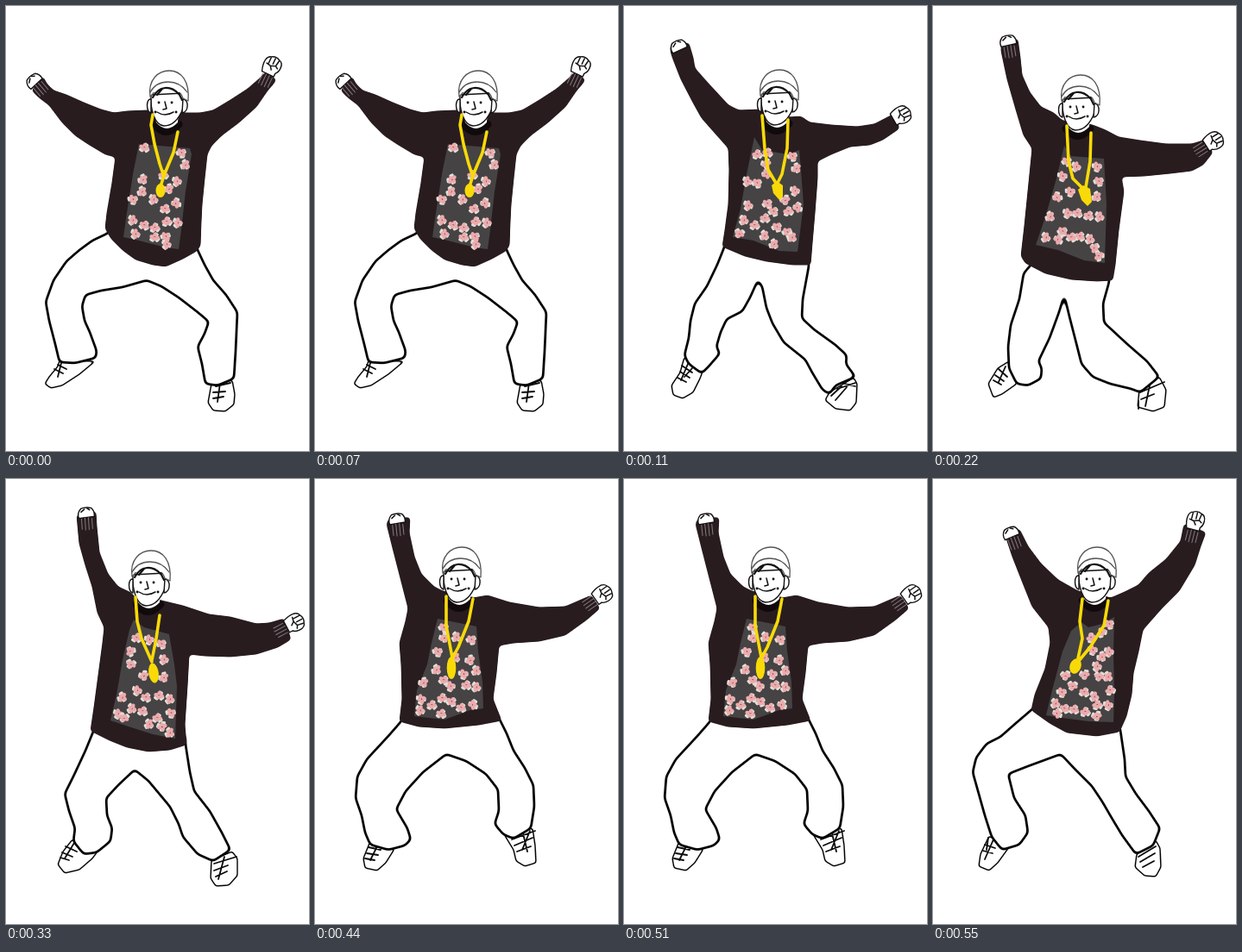
Recreate the animation shown at these times as an HTML page without scripts. Size 351x516 px, loop 660 ms.

```html
<!DOCTYPE html>
<html lang="en">
<head>
<meta charset="utf-8">
<title>Dancer</title>
<style>
html, body { margin: 0; width: 100%; height: 100%; overflow: hidden; background: #fff; }
svg { display: block; width: 100%; height: 100%; stroke-linecap: round; stroke-linejoin: round; }
.pose { opacity: 0; animation: show 660ms step-end infinite; animation-delay: calc(var(--i) * 110ms - 660ms); }
@keyframes show { 0% { opacity: 1; } 16.6666%, 100% { opacity: 0; } }
.pants { filter: url(#outline); }
.shoes { filter: url(#fine); }
.laces { fill: none; stroke: #0c0a0a; stroke-width: 1.8; }
.top { fill: #281c20; stroke: #281c20; stroke-width: 1; filter: url(#soft); }
.panel { fill: #464344; }
.print { fill: none; marker: url(#flower); }
.chain { fill: none; stroke: #f8da08; stroke-width: 3.6; }
.charm { fill: #f8da08; }
.ink { fill: #fff; stroke: #141212; stroke-width: 1.4; }
.cap { fill: #fff; stroke: #555; stroke-width: 1.3; }
.line { fill: none; stroke: #141212; stroke-width: 1.5; }
</style>
</head>
<body>
<svg viewBox="0 0 351 516">
<defs>
  <!-- Round the corners of a silhouette: blur, then sharpen the edge -->
  <filter id="soft" color-interpolation-filters="sRGB">
    <feGaussianBlur stdDeviation="2.3"/>
    <feComponentTransfer>
      <feFuncR type="linear" slope="0" intercept=".157"/>
      <feFuncG type="linear" slope="0" intercept=".11"/>
      <feFuncB type="linear" slope="0" intercept=".125"/>
      <feFuncA type="linear" slope="6" intercept="-2.5"/>
    </feComponentTransfer>
  </filter>
  <!-- White shape with a soft-cornered ink line: two cuts through one blur -->
  <filter id="outline" color-interpolation-filters="sRGB">
    <feGaussianBlur in="SourceAlpha" stdDeviation="2.8" result="blur"/>
    <feComponentTransfer in="blur" result="ink">
      <feFuncA type="linear" slope="7" intercept="-1.6"/>
    </feComponentTransfer>
    <feComponentTransfer in="blur" result="cut">
      <feFuncA type="linear" slope="7" intercept="-4.4"/>
    </feComponentTransfer>
    <feFlood flood-color="#fff"/>
    <feComposite in2="cut" operator="in" result="fill"/>
    <feMerge><feMergeNode in="ink"/><feMergeNode in="fill"/></feMerge>
  </filter>
  <filter id="fine" color-interpolation-filters="sRGB">
    <feGaussianBlur in="SourceAlpha" stdDeviation="1.7" result="blur"/>
    <feComponentTransfer in="blur" result="ink">
      <feFuncA type="linear" slope="4" intercept="-.78"/>
    </feComponentTransfer>
    <feComponentTransfer in="blur" result="cut">
      <feFuncA type="linear" slope="4" intercept="-2.22"/>
    </feComponentTransfer>
    <feFlood flood-color="#fff"/>
    <feComposite in2="cut" operator="in" result="fill"/>
    <feMerge><feMergeNode in="ink"/><feMergeNode in="fill"/></feMerge>
  </filter>
  <marker id="flower" orient="auto" markerUnits="userSpaceOnUse" markerWidth="16" markerHeight="16" viewBox="-8 -8 16 16">
    <path d="M-4 3l2 1M3 4l2-2M1-4l2 1" stroke="#dfe0d8" stroke-width="3.4" stroke-linecap="round"/>
    <path d="M-3.5-.5h.8M.3-2.8h.6M3.2.5h.6M-.3 2.2h.6" stroke="#eeaaad" stroke-width="4.4" stroke-linecap="round"/>
  </marker>
  <g id="fist">
    <path class="ink" d="M-8 10Q-11 2-10-4-9-9-5-10 0-13 5-10 10-9 10-2 10 3 7 6L7 10Z"/>
    <path class="line" d="M-5-9L-5-2M0-10L0-3M5-9L4-3M-7-1L-2 0 4-2 7 0M-2 0L1 4"/>
  </g>
  <g id="palm">
    <path class="ink" d="M-9 6Q-11 0-6-5 0-7 6-5 10-1 9 5Z"/>
    <path class="line" d="M-6-1L-2-4M1-5L4-3"/>
  </g>
  <path id="cuff" d="M-6-6V6M-2-7V7M2-7V7M6-6V6" stroke="#857a7e" fill="none"/>
  <g id="head">
    <path d="M-14 22Q-1 39 14 22" fill="none" stroke="#100a0c" stroke-width="9"/>
    <path d="M-14 8L-12 20Q0 34 13 20L14 6Z" fill="#fff"/>
    <path class="ink" d="M-18-12C-19 5-14 23-3 24 8 24 15 14 19 4L20-14Z"/>
    <path class="ink" d="M-18-7C-24-8-24 7-18 9ZM19-7C26-7 26 8 18 9Z"/>
    <path class="cap" d="M-19-10C-22-30-9-40 3-40 17-40 27-28 25-5L19-8C15-22-8-26-17-12Z"/>
    <path class="cap" d="M-19-15C-10-31 13-31 24-15"/>
    <path d="M-16-9C-9-23 5-23 14-13M-5-19L-11-12M14-14L18-6" fill="none" stroke="#141212" stroke-width="2.2"/>
    <path class="line" d="M-2-4L0 4-4 5M-11 8Q-2 14 8 8"/>
    <path d="M-9-3h.1M6-3h.1M-13 8h.1M11 8h.1" stroke="#141212" stroke-width="2.8"/>
  </g>
</defs>

<g class="pose" style="--i:0">
  <path class="shoes" d="M62 411L60 418 50 430 45 438 52 443 65 440 85 427 103 412ZM238 438L234 460 240 469 254 470 264 462 265 450 262 434Z"/>
  <path class="laces" d="M56 421L66 426M60 416L70 421M64 414L60 430M240 448L254 447M240 455L252 453M248 437L245 459M243 441L260 437"/>
  <path class="pants" d="M122 255L119 263 100 272 85 283 70 296 55 318 46 343 50 365 57 392 62 413 80 414 104 408 105 400 97 378 91 365 88 348 92 335 110 330 135 326 163 318 180 325 200 338 222 355 235 366 230 380 222 395 227 415 231 438 245 440 264 432 266 400 268 355 255 335 240 318 230 300 222 283 218 272Z"/>
  <path class="top" d="M43 82L47 90 55 98 70 103 90 112 110 120 125 124 140 122 163 121 207 124 225 124 240 121 260 109 280 96 296 82 300 77 313 85 310 90 303 98 290 117 270 135 250 150 238 162 233 172 230 200 227 230 226 250 225 278 221 284 205 293 185 302 170 300 150 294 135 283 122 270 115 258 117 240 123 205 127 175 115 172 95 160 80 150 65 135 50 115 38 106 30 98Z"/>
  <path class="panel" d="M154 160L213 165 215 172 208 215 203 260 200 282 185 280 150 271 136 268 140 240 147 195Z"/>
  <path class="print" d="M160 164L203 170 208 184 159 201 158 215 147 224 182 196 198 203 189 212 171 224 184 235 197 229 147 248 160 254 172 257 186 250 199 251 150 264 172 268 185 267 186 276"/>
  <use href="#head" x="186" y="115"/>
  <path class="chain" d="M170 126L168 138 172 160 178 183 183 198M199 146L194 170 184 194 178 212"/>
  <ellipse class="charm" cx="179" cy="214" rx="5.5" ry="8"/>
  <g transform="translate(32 86) rotate(-40)"><use href="#palm"/><use href="#cuff" y="13"/></g>
  <g transform="translate(308 70) rotate(25)"><use href="#fist"/><use href="#cuff" y="18"/></g>
</g>

<g class="pose" style="--i:1">
  <path class="shoes" d="M70 407L65 425 55 440 57 451 68 455 80 448 88 432 91 424ZM238 448L233 457 245 467 262 469 269 460 270 438 266 431Z"/>
  <path class="laces" d="M67 417L79 425M65 424L76 431M62 431L72 436M74 415L66 434M79 420L70 430M240 452L252 441M245 457L258 442M252 437L268 441M247 444L268 437"/>
  <path class="pants" d="M118 272L116 280 108 300 96 325 82 345 77 365 75 385 70 405 75 415 90 426 98 418 111 403 107 395 112 378 119 363 137 354 146 338 155 318 160 325 165 350 172 368 185 390 210 410 218 425 230 445 238 450 245 440 268 430 257 415 258 405 245 393 220 375 206 362 207 340 214 302 214 292Z"/>
  <path class="top" d="M75 43L80 60 82 72 97 89 110 103 121 115 133 121 157 120 191 129 205 128 215 135 240 138 270 140 290 137 313 125 319 142 300 155 285 161 262 163 240 172 224 180 224 200 221 240 218 275 216 300 195 300 165 296 140 290 114 279 117 260 121 230 122 190 121 165 105 147 90 130 80 112 66 85 57 62 54 53 54 46Z"/>
  <path class="panel" d="M151 152L160 167 190 172 203 167 205 190 208 230 201 285 180 284 150 272 126 268 135 235 142 195Z"/>
  <path class="print" d="M154 172L166 170 195 174 200 188 165 183 154 205 165 195 143 203 198 214 187 225 144 231 166 229 173 238 190 238 201 234 139 248 151 254 163 246 177 256 189 262 195 268 163 266 174 276 134 264"/>
  <use href="#head" x="177" y="114"/>
  <path class="chain" d="M160 127L163 165 167 190 177 207M190 132L189 165 183 195 177 207"/>
  <path class="charm" d="M177 203L171 208 173 217 180 225 184 221 184 208Z"/>
  <use href="#palm" transform="translate(63 46) rotate(-22)"/>
  <use href="#fist" transform="translate(321 127) rotate(60)"/>
</g>

<g class="pose" style="--i:2">
  <path class="shoes" d="M88 412L75 420 64 438 70 454 80 450 97 438ZM239 445L237 465 255 470 268 465 270 445 262 430Z"/>
  <path class="laces" d="M76 421L86 430M72 428L82 435M70 434L79 439M84 418L76 436M240 448L268 436M241 456L256 450M238 458V467M251 440L246 464"/>
  <path class="pants" d="M118 288L117 296 105 310 100 340 90 370 87 395 88 420 97 438 110 440 125 432 126 420 122 412 135 385 146 355 152 335 158 360 167 395 172 415 185 430 205 438 230 444 240 448 262 430 248 412 225 392 198 367 197 345 204 320 204 308Z"/>
  <path class="top" d="M98 38L101 60 103 80 112 100 125 117 140 124 150 133 185 138 200 144 215 152 240 156 270 160 300 160 316 155 324 170 313 184 300 191 275 194 245 197 218 198 221 215 215 260 211 300 208 318 190 319 160 317 130 310 107 298 102 290 106 255 110 215 115 165 105 150 96 120 86 85 79 52 79 46Z"/>
  <path class="panel" d="M152 162L160 174 198 177 201 230 199 298 175 295 145 283 119 277 130 245 143 200Z"/>
  <path class="print" d="M155 180L166 186 150 197 190 186 159 215 192 203 190 221 156 240 167 240 180 243 193 244 136 244 150 261 170 267 182 270 131 268 187 281 145 271 160 268 192 290 144 222"/>
  <use href="#head" x="168" y="120"/>
  <path class="chain" d="M155 139L157 180 162 200 176 214M183 147L182 180 177 210"/>
  <path class="charm" d="M174 208L168 213 172 225 179 232 184 227 182 212Z"/>
  <g transform="translate(87 40) rotate(-9)"><use href="#palm"/><use href="#cuff" y="13"/></g>
  <g transform="translate(325 157) rotate(58)"><use href="#fist"/><use href="#cuff" y="18"/></g>
</g>

<g class="pose" style="--i:3">
  <path class="shoes" d="M77 418L66 432 60 447 68 457 85 453 100 440 106 432ZM238 442L237 463 243 472 258 471 268 460 268 440 262 432Z"/>
  <path class="laces" d="M69 426L82 432M65 433L77 438M63 439L73 442M79 422L68 440M241 446L267 438M241 454L257 448M243 461L256 455M253 438L246 464"/>
  <path class="pants" d="M104 285L101 293 92 315 78 345 68 365 73 385 80 405 78 420 90 435 105 433 121 420 123 405 117 390 116 370 130 355 149 337 165 350 190 380 200 400 205 415 222 435 240 443 260 430 250 410 236 385 218 362 213 340 208 308 208 298Z"/>
  <path class="top" d="M104 38L105 55 108 85 118 110 130 125 145 132 152 140 180 141 205 147 235 157 260 160 290 168 305 167 322 162 330 186 315 195 290 203 260 206 230 205 212 203 210 240 207 285 209 308 190 314 165 316 140 311 120 303 98 292 102 265 108 220 112 190 114 172 106 155 100 125 92 100 85 75 82 42Z"/>
  <path class="panel" d="M148 163L160 172 189 180 195 215 198 240 196 301 170 296 145 288 121 280 128 250 135 210 143 175Z"/>
  <path class="print" d="M151 184L166 186 145 215 144 200 180 191 183 209 183 230 160 228 152 245 162 253 177 251 190 255 135 253 146 266 130 272 158 269 175 277 191 271 181 287 166 284 190 294 137 277"/>
  <use href="#head" x="165" y="123"/>
  <path class="chain" d="M150 137L152 165 157 185 169 212M178 158L174 185 169 210"/>
  <ellipse class="charm" cx="171" cy="225" rx="5.8" ry="11.5" transform="rotate(-8 171 225)"/>
  <g transform="translate(93 39) rotate(-4)"><use href="#palm"/><use href="#cuff" y="13"/></g>
  <g transform="translate(334 167) rotate(62)"><use href="#fist"/><use href="#cuff" y="18"/></g>
</g>

<g class="pose" style="--i:4">
  <path class="shoes" d="M64 420L56 440 58 451 72 454 82 445 92 429ZM219 412L230 430 233 443 243 449 256 445 255 425 252 405Z"/>
  <path class="laces" d="M62 427L76 430M60 434L73 436M58 440L69 442M73 424L64 442M228 418L255 408M231 425L252 416M234 432L250 426M241 411L246 432M249 408L240 430"/>
  <path class="pants" d="M104 274L99 282 85 298 60 325 49 345 47 370 54 390 58 410 64 424 85 430 104 425 111 418 107 405 94 383 105 362 125 340 152 319 175 327 198 342 212 360 213 385 208 400 218 412 230 417 250 405 254 380 253 355 243 335 230 315 222 295 215 281 211 273Z"/>
  <path class="top" d="M110 45L109 62 115 90 123 110 138 125 148 130 183 138 200 135 225 143 260 149 290 148 320 135 330 150 315 163 290 181 260 188 230 190 213 193 210 225 206 255 216 280 190 285 150 289 120 287 98 281 101 255 100 215 98 190 105 165 108 150 99 115 90 80 83 52 86 46Z"/>
  <path class="panel" d="M142 162L187 171 189 200 194 235 195 266 180 268 150 279 115 275 118 245 130 215 135 190Z"/>
  <path class="print" d="M149 172L164 183 150 184 142 200 181 186 180 210 163 207 187 222 141 221 149 233 172 226 157 240 175 239 187 241 126 236 123 255 135 262 147 254 158 258 169 265 183 262 122 268 146 272"/>
  <use href="#head" x="167" y="119"/>
  <path class="chain" d="M152 136L152 170 159 207M183 139L178 165 166 195 159 208"/>
  <ellipse class="charm" cx="158" cy="219" rx="5.3" ry="13"/>
  <g transform="translate(95 46) rotate(-6)"><use href="#palm"/><use href="#cuff" y="13"/></g>
  <g transform="translate(333 134) rotate(55)"><use href="#fist"/><use href="#cuff" y="18"/></g>
</g>

<g class="pose" style="--i:5">
  <path class="shoes" d="M65 414L55 435 53 449 65 454 75 445 88 427ZM236 435L234 450 245 460 258 461 264 450 263 428 258 419Z"/>
  <path class="laces" d="M60 424L72 428M58 431L69 434M70 418L60 441M64 416L62 430M238 438L258 426M240 444L257 434M243 450L256 443"/>
  <path class="pants" d="M121 258L116 266 95 284 78 299 62 307 50 323 46 340 53 365 60 390 68 415 80 430 100 424 110 410 107 390 94 370 87 342 110 333 148 319 165 337 184 356 196 374 207 393 219 413 235 435 255 425 263 405 250 385 235 365 223 345 222 325 217 291 215 283Z"/>
  <path class="top" d="M100 58L110 78 125 98 145 117 168 130 206 138 222 131 238 123 250 109 270 93 287 72 291 52 316 62 310 78 303 100 285 130 265 150 243 175 238 200 232 225 230 250 224 275 216 293 190 298 155 294 135 283 114 268 118 250 130 220 136 190 134 172 115 148 103 118 92 90 84 66Z"/>
  <path class="panel" d="M160 176L172 166 180 172 196 168 210 160 209 200 210 250 209 282 180 281 150 277 131 274 138 245 150 200Z"/>
  <path class="print" d="M183 184L195 178 204 168 185 198 204 200 196 206 190 217 203 229 193 229 176 227 162 240 154 228 149 247 175 247 187 252 142 260 152 266 163 267 176 270 190 262 203 262 190 275 144 272 205 245"/>
  <use href="#head" x="187" y="119"/>
  <path class="chain" d="M173 139L170 165 173 185 168 208M203 141L198 170 182 195 168 212"/>
  <ellipse class="charm" cx="165" cy="217" rx="6.5" ry="9" transform="rotate(20 165 217)"/>
  <g transform="translate(90 62) rotate(-20)"><use href="#palm"/><use href="#cuff" y="13"/></g>
  <g transform="translate(304 49) rotate(14)"><use href="#fist"/><use href="#cuff" y="18"/></g>
</g>
</svg>
</body>
</html>
```
